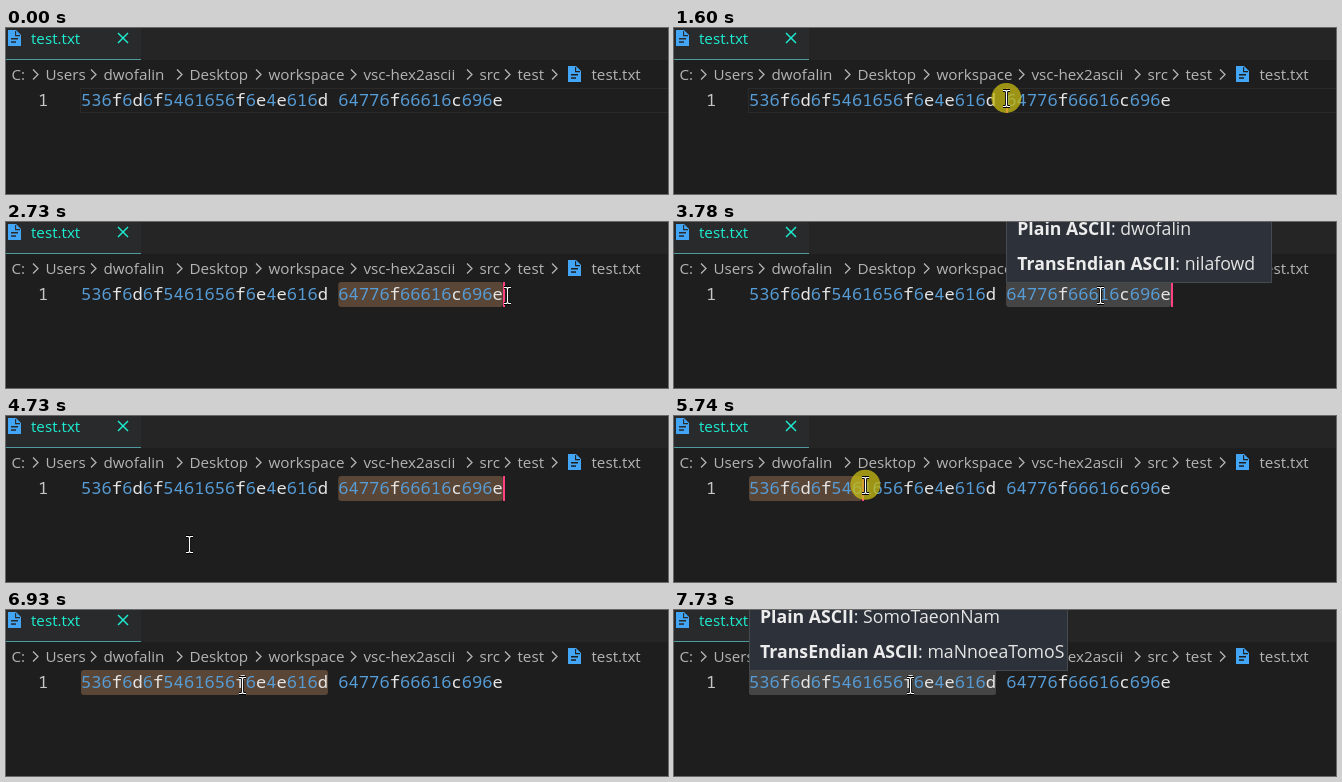
Animation of 662x166 px, one loop 8000 ms. Source, as an HTML page with a canvas:

```html
<!DOCTYPE html>
<html lang="en">
<head>
<meta charset="utf-8">
<title>Hex to ASCII hover</title>
<style>
html, body { margin: 0; width: 100%; height: 100%; overflow: hidden; background: #1e1e1e; }
canvas { display: block; }
</style>
</head>
<body>
<canvas id="stage" width="662" height="166"></canvas>
<script>
const ctx = document.getElementById('stage').getContext('2d');
const LOOP = 8000;
const UI = '"Open Sans", "Noto Sans", sans-serif';
const MONO = '"Noto Sans Mono", "DejaVu Sans Mono", monospace';
const SMALL = '15.2px ' + UI, LARGE = '17.7px ' + UI;
const TEAL = '#1deed2', BLUE = '#42a5f5', GREY = '#b4b4b4', BACK = '#1e1e1e';
const LEFT = 75, CHAR = 10.29, TOP = 60, ROW = 25, BLINK = 485;

const WORDS = ['SomoTaeonNam', 'dwofalin'];
const toHex = s => [...s].map(c => c.charCodeAt(0).toString(16)).join('');
const HEX = WORDS.map(toHex).join(' ');

const CRUMBS = [
  ['C:', 6], ['Users', 40], [WORDS[1], 98], ['Desktop', 184], ['workspace', 263],
  ['vsc-hex2ascii', 358], ['src', 474], ['test', 512], ['test.txt', 586]
];

// Pointer moves, each starting where the last one ended
const MOVES = [
  { from: 330, to: 990, x: 332, y: 70 },
  { from: 1600, to: 2330, x: 502, y: 73 },
  { from: 2730, to: 2920, x: 426, y: 73 },
  { from: 4540, to: 4730, x: 183, y: 128 },
  { from: 4730, to: 5340, x: 75, y: 66 },
  { from: 5470, to: 6250, x: 321, y: 72 },
  { from: 6730, to: 6930, x: 236, y: 75 }
];
// Each drag selects one word; its tooltip follows
const DRAGS = [
  { move: MOVES[1], release: 2730, first: 25, last: 41, tip: 3250, tipEnd: 4660, tipWidth: 266, word: WORDS[1] },
  { move: MOVES[5], release: 6730, first: 0, last: 24, tip: 7260, tipEnd: LOOP, tipWidth: 319, word: WORDS[0] }
];

const clamp = (v, lo, hi) => Math.max(lo, Math.min(hi, v));
const colX = col => LEFT + col * CHAR;

function pointerAt(t) {
  let x = 503, y = 184;
  for (const m of MOVES) {
    const p = 1 - (1 - clamp((t - m.from) / (m.to - m.from), 0, 1)) ** 1.5;
    x += (m.x - x) * p;
    y += (m.y - y) * p;
  }
  return [x, y];
}

function caretCol(drag, t) {
  const at = clamp(t - 20, drag.move.from, drag.release - 1);
  return clamp(Math.round((pointerAt(at)[0] - LEFT) / CHAR), drag.first, drag.last);
}

const caretOn = (drag, t) =>
  t < drag.move.to || Math.floor((t - drag.move.to) / BLINK) % 2 === 0;

function rect(x, y, w, h, color) {
  ctx.fillStyle = color;
  ctx.fillRect(x, y, w, h);
}

function text(s, x, y, font, color) {
  ctx.font = font;
  ctx.fillStyle = color;
  ctx.fillText(s, x, y);
  return x + ctx.measureText(s).width;
}

function line(points, color, width) {
  ctx.beginPath();
  for (const [x, y] of points) ctx.lineTo(x, y);
  ctx.strokeStyle = color;
  ctx.lineWidth = width;
  ctx.stroke();
}

function fileIcon(x, y, back) {
  ctx.fillStyle = BLUE;
  ctx.beginPath();
  for (const [dx, dy] of [[0, 0], [8, 0], [13, 5], [13, 16], [0, 16]]) ctx.lineTo(x + dx, y + dy);
  ctx.fill();
  line([[x + 7.6, y + 1], [x + 7.6, y + 5.6], [x + 12, y + 5.6]], back, 1.1);
  rect(x + 3, y + 8, 7, 1.5, back);
  rect(x + 3, y + 11.3, 5, 1.5, back);
}

function drawChrome() {
  const tab = '#292a2b';
  rect(0, 0, 662, 166, BACK);
  rect(0, 0, 662, 32, '#252526');
  rect(0, 0, 135, 31, tab);
  rect(0, 31, 135, 1, '#4f9a9c');
  fileIcon(2, 2, tab);
  text('test.txt', 25, 16, SMALL, TEAL);
  for (const s of [-1, 1]) line([[117 - 5 * s, 5], [117 + 5 * s, 15]], TEAL, 1.4);

  CRUMBS.forEach(([label, x], i) => {
    text(label, x - .5, 52, SMALL, GREY);
    if (!i) return;
    const isFile = i === CRUMBS.length - 1;
    const c = x - (isFile ? 37.5 : 10.5);
    line([[c - 2.5, 41.5], [c + 2.5, 46.5], [c - 2.5, 51.5]], GREY, 1.3);
    if (isFile) fileIcon(x - 24, 38, BACK);
  });
}

function drawCode(drag, t, hover) {
  const end = drag ? caretCol(drag, t) : 0;
  if (!drag || end === drag.first) {
    ctx.strokeStyle = '#2a2a2a';
    ctx.lineWidth = 1;
    ctx.strokeRect(LEFT - .5, TOP + .5, 600, ROW - 1);
  } else {
    ctx.beginPath();
    ctx.roundRect(colX(drag.first), TOP, (end - drag.first) * CHAR, ROW, 3);
    ctx.fillStyle = '#5a4636';
    ctx.fill();
    ctx.globalAlpha = hover;
    ctx.fillStyle = '#464545';
    ctx.fill();
    ctx.globalAlpha = 1;
  }
  const font = '17.15px ' + MONO;
  text('1', 32, 78, font, '#c6c6c6');
  [...HEX].forEach((c, i) => text(c, colX(i), 78, font, c >= 'a' ? '#e6e6e6' : '#569cd6'));
  if (drag && caretOn(drag, t)) rect(Math.round(colX(end)), TOP, 2, ROW, '#ff4081');
}

function drawTip(drag, alpha) {
  const x = colX(drag.first), w = drag.tipWidth;
  const row = (label, value, y) => {
    const end = text(label, x + 11, y, '700 ' + LARGE, '#ececec');
    text(': ' + value, end, y, LARGE, '#e4e4e4');
  };
  ctx.globalAlpha = alpha;
  rect(Math.round(x), -5, w, 66, '#454a50');
  rect(Math.round(x) + 1, -5, w - 2, 65, '#2d323a');
  row('Plain ASCII', drag.word, 13);
  row('TransEndian ASCII', [...drag.word].reverse().join(''), 48);
  ctx.globalAlpha = 1;
}

function drawPointer(t, pressed) {
  const [px, py] = pointerAt(t);
  if (pressed) {
    ctx.fillStyle = 'rgba(200, 188, 20, .75)';
    ctx.beginPath();
    ctx.arc(px, py, 15, 0, Math.PI * 2);
    ctx.fill();
  }
  const x = Math.round(px) + .5, y = Math.round(py) + .5;
  for (const [color, width] of [['#000', 3], ['#fff', 1.2]]) {
    line([[x, y - 7], [x, y + 7]], color, width);
    for (const s of [-1, 1]) {
      line([[x - 3.5, y + s * 8], [x - 1, y + s * 8], [x, y + s * 7],
            [x + 1, y + s * 8], [x + 3.5, y + s * 8]], color, width);
    }
  }
}

function render(t) {
  const drag = DRAGS.filter(d => t >= d.move.from).pop();
  const tipOpen = drag && t >= drag.tip && t < drag.tipEnd;
  const alpha = tipOpen ? Math.min(1, (t - drag.tip + 35) / 105) : 0;
  drawChrome();
  drawCode(drag, t, alpha);
  if (tipOpen) drawTip(drag, alpha);
  drawPointer(t, drag && t < drag.release);
}

const start = performance.now();
function tick() {
  render((performance.now() - start) % LOOP);
  requestAnimationFrame(tick);
}
tick();
</script>
</body>
</html>
```
